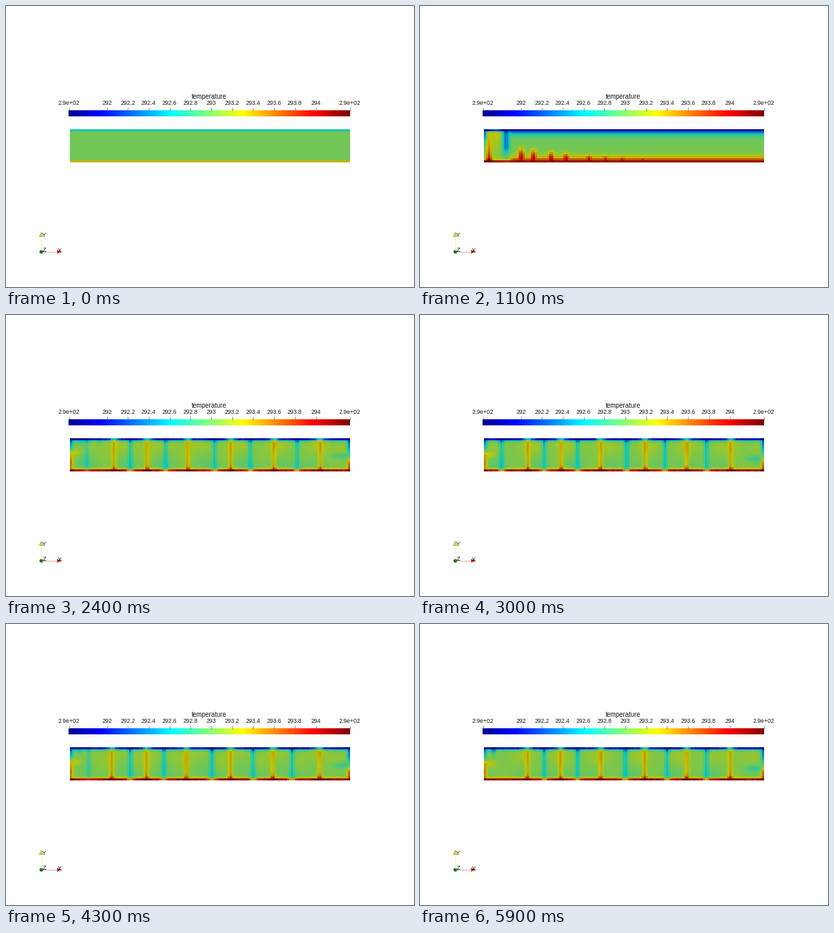
A matplotlib script that plays this animation: 600x415 px, repeating every 6 s.

```python
import numpy as np
import matplotlib.pyplot as plt
from matplotlib.animation import FuncAnimation
from matplotlib.patches import Circle, Polygon

W, H, DPI = 600, 415, 100
FRAMES, STEP = 60, 100
LEFT, RIGHT, TOP, BOTTOM = 94, 506, 183, 231.5
NX, NY = 137, 16

# Jet colour map: position, red, green, blue
JET = np.array([
    (0, 0, 0, 0.5625), (0.111, 0, 0, 1), (0.365, 0, 1, 1),
    (0.492, 0.5, 1, 0.5), (0.619, 1, 1, 0), (0.873, 1, 0, 0), (1, 0.5, 0, 0),
])

# Plume centres at the key times, in seconds
KEYS = [1.8, 3.0, 3.8, 4.9, 5.9]
HOT = [
    (159, 159, 157, 154, 158), (208, 208, 207, 207, 207),
    (270, 266, 266, 265, 266), (329, 331, 331, 328, 330),
    (396, 392, 392, 392, 392), (467, 457, 462, 460, 456),
]
COLD = [
    (118, 120, 122, 121, 120), (183, 183, 183, 183, 183),
    (238, 232, 233, 232, 232), (309, 304, 302, 304, 302),
    (358, 360, 363, 363, 363), (435, 421, 421, 420, 421),
]
FIRST_COLD = (0.35, 1, 1, 0, 0)
SPROUTS = [149, 167, 193, 215, 249, 273, 298, 327, 355, 384, 412, 441, 468, 492]

dx = (RIGHT - LEFT) / NX
dy = (BOTTOM - TOP) / NY
x = LEFT + dx * (np.arange(NX) + 0.5)[None, :]
down = dy * (np.arange(NY) + 0.5)[:, None]
up = BOTTOM - TOP - down
rise, sink = up / (BOTTOM - TOP), down / (BOTTOM - TOP)
grain = np.random.default_rng(4).uniform(-1, 1, (2, NX))


def jet(u):
    return np.stack([np.interp(u, JET[:, 0], JET[:, i]) for i in (1, 2, 3)], -1)


def ease(u):
    u = np.clip(u, 0, 1)
    return u * u * (3 - 2 * u)


def bump(d, width):
    return np.exp(-(d / width) ** 2)


def blob(cx, cy, wx, wy):
    return bump(x - cx, wx) * bump(down + TOP - cy, wy)


def sprouts(centres, dist, growth):
    """Short columns that grow from a wall, tallest at the left."""
    out = np.zeros((NY, NX))
    for c in centres:
        tall = min(46, 29 * np.exp(-(c - 149) / 170) * growth)
        body = 0.4 * ease((tall - dist) / (0.8 * tall)) * ease(tall / 8)
        out = np.maximum(out, body * bump(x - c, 5.2))
    return out


def soaked(dist, amp, depth):
    return amp * np.exp(-((dist - dy / 2) / depth) ** 1.2)


def early(t):
    """Heat soaking in from the walls, then the first plumes at the left."""
    soak = np.sqrt(min(t / 1.1, 1.2))
    amp, depth = 0.13 + 0.3 * min(soak, 1), 0.8 + 4.5 * soak
    growth = np.exp((t - 1.1) * 7)
    drips = [c + 11 for c in SPROUTS[:-1]]
    lower = np.maximum(soaked(up, amp, depth), sprouts(SPROUTS, up, growth))
    upper = np.maximum(soaked(down, amp, 0.9 * depth), sprouts(drips, down, growth * 0.2))
    v = lower - upper

    g = ease((t - 0.75) / 0.33)
    near = g * ease((138 - x) / 10)
    walls = soaked(up, 0.42, 2.3) - soaked(down, 0.42, 1.8)
    v = v * (1 - near) + near * (walls + 0.12 * bump(x - 112, 9) * sink[::-1])
    v = v + g * bump(x - 101.5, 4) * (0.1 + 0.24 * bump(up, 20)) * ease(down / 6)
    v = v - g * bump(x - 126.5, 5) * (0.06 + 0.2 * ease((up - 10) / 14))
    return v - g * 0.28 * blob(94, 192, 3.5, 10)


def plumes(paths, t, weights):
    """Stem, flared foot and wide spread around the plumes."""
    stem, flare, wide = np.zeros((3, 1, NX))
    for path, w in zip(paths, weights):
        d = x - np.interp(t, KEYS, path)
        stem = np.maximum(stem, w * bump(d, 3.1))
        flare = np.maximum(flare, w * bump(d, 6))
        wide = np.maximum(wide, w * np.exp(-np.abs(d) / 20))
    return stem, flare, wide


def settled(t):
    """Row of steady convection cells."""
    first = np.interp(t, KEYS, FIRST_COLD)
    hot, hot_flare, hot_wide = plumes(HOT, t, [1] * 6)
    cold, cold_flare, cold_wide = plumes(COLD, t, [first] + [1] * 5)
    fresh = np.exp(-max(t - 1.8, 0) / 0.4)
    young = 0.45 + 0.5 * fresh
    strength = 1 - 0.45 * fresh

    v = 0.01 + 0.1 * young * (hot_wide + 0.4) * rise
    v = v - 0.1 * young * (cold_wide + 0.4) * sink ** 2
    v = v + 0.015 * np.sin(x / 9 + 1.7 * t) * np.sin(down / 8 - 1.1 * t)
    v = v + strength * hot * (0.11 + 0.15 * np.exp(-up / 9)) * ease(down / 8)
    v = v - strength * cold * (0.13 + 0.1 * np.exp(-down / 9)) * ease(up / 8)
    v = v + strength * 0.15 * hot_flare * np.exp(-up / 4)
    v = v - strength * 0.12 * cold_flare * np.exp(-down / 4)

    # End walls
    sway = np.sin(2.3 * t)
    v = v - 0.25 * blob(94, 190, 4.5, 12) + 0.23 * blob(94, 219, 4.5, 13)
    v = v - 0.3 * blob(506, 192, 4, 14) + 0.27 * blob(506, 223, 4, 11)
    v = v - 0.1 * blob(492, 211 + 3 * sway, 13, 4)
    v = v + 0.1 * blob(101, 206 + 2 * sway, 10, 3.5)
    v = v - 0.2 * (1 - first) * blob(108, 186, 4, 8)

    # Leftovers of the first mixing
    v = v - fresh * (0.2 * blob(113, 187, 4, 8) + 0.2 * blob(137, 186, 4, 6))
    v = v - fresh * 0.11 * blob(114, 210, 6, 9)
    v = v + fresh * 0.12 * blob(492, 203, 9, 10)

    # Thin layers along the floor and ceiling, broken where plumes land
    shimmer = 0.04 * np.sin(3 * t + 9 * grain)
    floor = (0.43 + shimmer[:1]) * (1 - 0.55 * cold_flare)
    roof = (0.43 + shimmer[1:]) * (1 - 0.55 * hot_flare)
    return v + soaked(up, floor, 2) - soaked(down, roof, 2.2)


def field(n):
    t = n * STEP / 1000
    s = ease((t - 1.15 - 0.3 * (x - LEFT) / (RIGHT - LEFT)) / 0.35)
    v = early(t)
    if t > 1.15:
        v = v * (1 - s) + settled(t) * s
    return 0.78 * jet(np.clip(0.51 + v, 0, 1))


fig = plt.figure(figsize=(W / DPI, H / DPI), dpi=DPI, facecolor="#fefefe")
ax = fig.add_axes([0, 0, 1, 1])
ax.axis("off")


def label(cx, base, text, px=9):
    ax.text(cx, base, text, size=px * 72 / DPI, family="Liberation Sans",
            color="#1c1c1c", ha="center", va="baseline")


def line(xs, ys, color, width=0.6):
    ax.plot(xs, ys, color=color, lw=width, solid_capstyle="butt")


# Colour legend
label(299, 136.5, "temperature", 9.7)
ticks = [(92.5, "2.9e+02"), (505.5, "2.9e+02")]
ticks += [(148.5 + 30.7 * i, f"{292 + 0.2 * i:g}") for i in range(11)]
for tx, text in ticks:
    label(tx, 146, text, 8.7)
    line([tx, tx], [150, 155], "#777777")
ax.imshow(jet(np.linspace(0, 1, 256))[None], extent=(92, 505.5, 163, 154.5),
          interpolation="nearest", aspect="auto")

# Axis triad
line([52, 52], [341, 361], "#f0efb4")
line([53, 76], [363, 363], "#c9a5a0")
ax.add_patch(Polygon([(49, 340.5), (54.5, 340.5), (51.8, 334)], fc="#d8d820", ec="#77772a", lw=0.3))
ax.add_patch(Polygon([(75, 360.3), (75, 365.7), (82, 363)], fc="#e01010", ec="none"))
ax.add_patch(Circle((52, 363), 2.7, fc="#1d6b1d", ec="none"))
label(79, 363.5, "X")
label(56, 340.5, "Y")
label(56.3, 363, "Z")

image = ax.imshow(field(0), extent=(LEFT, RIGHT, BOTTOM, TOP),
                  interpolation="nearest", aspect="auto")
ax.set_xlim(0, W)
ax.set_ylim(H, 0)


def update(n):
    image.set_data(field(n))
    return [image]


anim = FuncAnimation(fig, update, frames=FRAMES, interval=STEP, repeat=True,
                     repeat_delay=0, blit=False)
plt.show()
```
